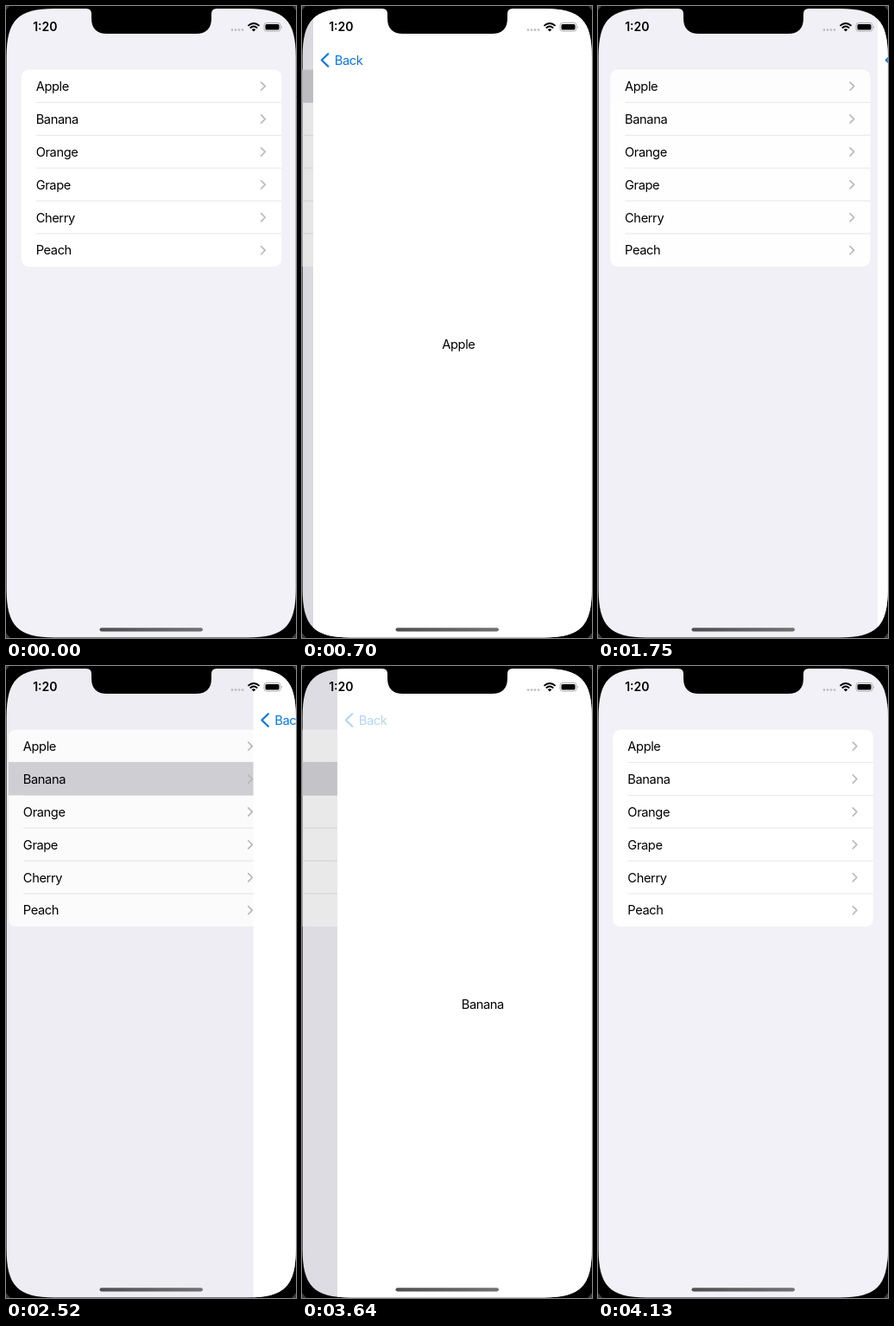
Write an HTML page that moves like this. It is 336 by 730 pixels and loops after 4.2 s.

```html
<!DOCTYPE html>
<html lang="en">
<head>
<meta charset="utf-8">
<title>List navigation</title>
<style>
  html, body { margin: 0; width: 100%; height: 100%; overflow: hidden; background: #000; }
  svg { display: block; width: 100%; height: 100%; }
  text { font: 14.65px Inter, Roboto, sans-serif; letter-spacing: -.4px; }
  .clock { font-size: 14px; font-weight: 600; letter-spacing: 0; }
  .line { fill: none; stroke-linecap: round; stroke-linejoin: round; }
</style>
</head>
<body>
<svg viewBox="0 0 336 730" xmlns="http://www.w3.org/2000/svg">
  <defs>
    <clipPath id="screen">
      <path d="M56 3H280C322.500 3 335.800 16.300 335.800 59V673.500C335.800 716 322.500 729.500 280 729.500H56C13.800 729.500 .6 716 .6 673.500V59C.6 16.300 13.800 3 56 3Z"/>
    </clipPath>
    <clipPath id="card"><rect x="17.700" y="73.400" width="301.500" height="227.500" rx="8.600"/></clipPath>
    <linearGradient id="bar"><stop stop-color="#505050"/><stop offset="1" stop-color="#727272"/></linearGradient>
  </defs>
  <rect width="336" height="730"/>
  <path d="M0 0H4L0 5ZM336 0H332L336 5ZM0 730H5L0 724ZM336 730H331L336 724Z" fill="#3a3a3a"/>

  <g clip-path="url(#screen)">
    <rect width="336" height="730" fill="#f2f1f7"/>
    <g id="list">
      <g clip-path="url(#card)">
        <rect x="17" y="73" width="303" height="229" fill="#fff"/>
        <g id="rules" fill="#e4e4e7"></g>
        <rect id="pick" x="17" width="303" height="38.500" fill="#d1d1d6"/>
      </g>
      <g id="rows"></g>
    </g>
    <rect id="dim" width="336" height="730"/>
    <g id="page">
      <rect width="340" height="730" fill="#fff"/>
      <g id="back">
        <path class="line" d="M17.300 55.300L9.800 62.500L17.300 69.700" stroke="#0a76e2" stroke-width="2.200"/>
        <text x="24.800" y="67.600" fill="#0a76e2">Back</text>
      </g>
      <text id="label" x="168.400" y="396.200" text-anchor="middle"></text>
    </g>

    <text class="clock" x="31.200" y="29">1:20</text>
    <g fill="#bdbdc1">
      <circle cx="262" cy="27.600" r="1.350"/><circle cx="266" cy="27.600" r="1.350"/>
      <circle cx="270" cy="27.600" r="1.350"/><circle cx="274" cy="27.600" r="1.350"/>
    </g>
    <g class="line" stroke="#000" stroke-width="1.900" style="stroke-linecap:butt">
      <path d="M280.400 22.900Q287 16.900 293.600 22.900"/>
      <path d="M282.800 25.500Q287 21.700 291.200 25.500"/>
    </g>
    <path d="M284.700 27.200Q287 25.300 289.300 27.200L287 29.600Z"/>
    <rect x="299" y="19.500" width="19" height="9.600" rx="2.800" fill="none" stroke="#a5a5a8" stroke-width=".9"/>
    <rect x="300.500" y="21" width="16" height="6.600" rx="1.500"/>
    <path d="M319.200 22.700Q321 24.300 319.200 25.900Z" fill="#a5a5a8"/>
    <rect x="108.500" y="718.200" width="119.500" height="4.300" rx="2.150" fill="url(#bar)"/>
  </g>
  <path d="M93 2V3Q99 3 99 9V14C99 26 105 32 117 32H220C232 32 238 26 238 14V9Q238 3 244 3V2Z"/>
</svg>
<script>
  const $ = id => document.getElementById(id);
  const LOOP = 4200, TICK = 70, WIDTH = 336, TOP = 73.4, ROW = 37.9;
  const FRUITS = ['Apple', 'Banana', 'Orange', 'Grape', 'Cherry', 'Peach'];
  const VISITS = [
    { row: 0, push: 363, press: 1400, pop: 1407 },
    { row: 1, push: 2475, press: 3500, pop: 3600 }
  ];

  $('rows').innerHTML = FRUITS.map((name, i) => {
    const y = TOP + ROW * (i + .5);
    return `<text x="34.7" y="${y + 5.6}">${name}</text>
      <path class="line" stroke="#bbbbbf" stroke-width="1.7" d="M295.6 ${y - 4.3}l4.6 4.6l-4.6 4.6"/>`;
  }).join('');
  $('rules').innerHTML = FRUITS.slice(1).map((_, i) =>
    `<rect x="35" y="${TOP + ROW * (i + 1) - .4}" width="285" height=".9"/>`).join('');

  // Share of the way left for a critically damped spring.
  function remaining(ms) {
    const x = Math.max(0, ms) * .015;
    return (1 + x) * Math.exp(-x);
  }

  function draw(t) {
    const visit = t < 2450 ? VISITS[0] : VISITS[1];
    const leaving = t >= visit.pop;
    const left = remaining(t - (leaving ? visit.pop : visit.push));
    let offset = WIDTH * (leaving ? 1 - left : left);
    if (offset < .3) offset = 0;
    if (offset > WIDTH - .4) offset = WIDTH;
    const open = 1 - offset / WIDTH;

    $('list').setAttribute('transform', `translate(${-.3 * WIDTH * open} 0)`);
    $('page').setAttribute('transform', `translate(${offset} 0)`);
    $('page').setAttribute('visibility', open ? 'visible' : 'hidden');
    $('dim').setAttribute('opacity', .1 * open);
    $('pick').setAttribute('y', TOP + ROW * visit.row - .4);
    $('pick').setAttribute('opacity', leaving ? open : +(t >= visit.push));
    const restore = Math.min(1, Math.max(0, t - visit.pop) / 300);
    $('back').setAttribute('opacity', t < visit.press ? 1 : .2 + .8 * restore);
    $('label').textContent = FRUITS[visit.row];
  }

  function tick() {
    const t = performance.now() % LOOP;
    draw(Math.floor(t / TICK) * TICK);
    requestAnimationFrame(tick);
  }
  tick();
</script>
</body>
</html>
```
